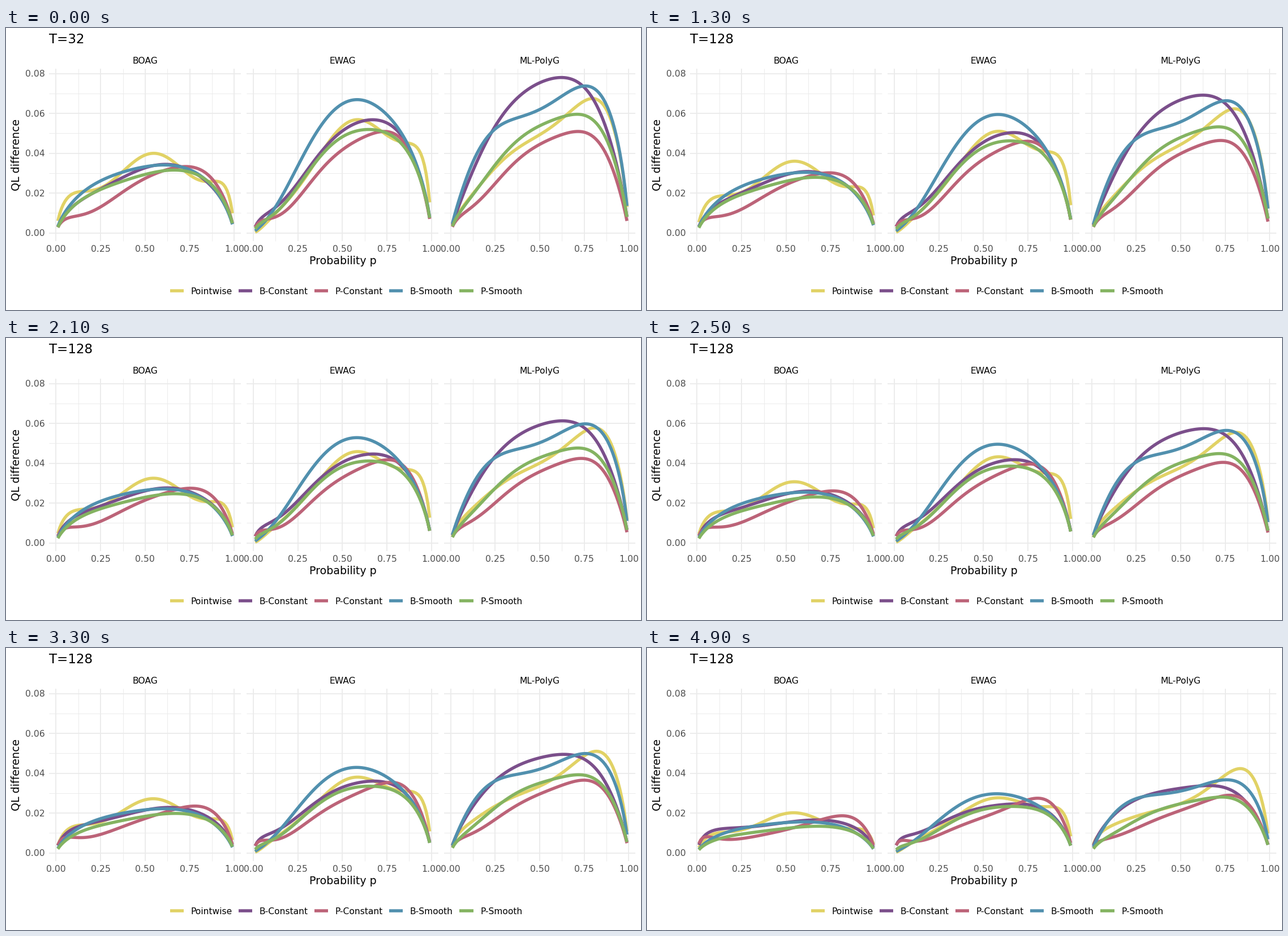
These frames come from a looping animation (1122x499 px, 8000 ms). A matplotlib script:

```python
import numpy as np
import matplotlib.pyplot as plt
from matplotlib.animation import FuncAnimation

W, H, DPI = 1122, 499, 64
PT = 72 / DPI                      # points per pixel
STEP_MS, FRAMES, HOLD, STEPS = 100, 80, 4, 45
LEFT, PANEL_GAP, UNIT_X = 88.5, 348.55, 314.7
ZERO_Y, UNIT_Y = 362.5, 3525
TOP, BOTTOM, PAD = 72, 376.5, 12

plt.rcParams["font.family"] = "DejaVu Sans"

# name, colour, legend key x
SERIES = [
    ("Pointwise", "#E1D265", 290),
    ("B-Constant", "#7B4F8B", 411),
    ("P-Constant", "#BC6378", 545),
    ("B-Smooth", "#5190AE", 677),
    ("P-Smooth", "#84B361", 801.5),
]

# Per series: height in thousandths at KEYS for T=32,
# and the share of it left at SHARE_KEYS for T=128.
KEYS = np.array([.01, .1, .35, .65, .9, .99])
SHARE_KEYS = np.array([.16, .42, .9])
PANELS = {
    "BOAG": [
        ((6, 19.9, 28.8, 36.3, 25.9, 9.8), (.5, .51, .47)),
        ((3, 13.7, 26.7, 34.2, 20.5, 4.5), (.7, .48, .58)),
        ((2.8, 8.2, 19, 32.4, 24.3, 5), (.72, .43, .67)),
        ((3.3, 16.2, 29.8, 33.9, 20.8, 4.3), (.48, .46, .46)),
        ((2.8, 13.6, 25.2, 31.5, 21.6, 4.8), (.45, .42, .44)),
    ],
    "EWAG": [
        ((.3, 7.5, 35.7, 55.2, 44.2, 15.3), (.62, .5, .52)),
        ((3, 11.2, 37.2, 56.7, 37.6, 7.5), (.7, .47, .47)),
        ((2.8, 7.3, 28.5, 49.2, 36.7, 7), (.65, .43, .63)),
        ((1, 9.8, 49.8, 65.6, 38, 8), (.52, .455, .45)),
        ((2, 8.4, 35.5, 51.9, 35.3, 7.5), (.55, .46, .47)),
    ],
    "ML-PolyG": [
        ((3.5, 16.8, 40.8, 59.2, 56.8, 13), (.66, .5, .68)),
        ((4, 25.8, 65.5, 77.8, 45, 8), (.57, .44, .48)),
        ((3, 11.6, 34.4, 50, 34.3, 6), (.56, .47, .65)),
        ((4.7, 30.2, 57, 70.1, 58.5, 13.5), (.54, .505, .5)),
        ((3.3, 16.2, 44.3, 58.8, 41.5, 8), (.5, .46, .49)),
    ],
}
PROB = np.linspace(.01, .99, 99)


def arch(p):
    return (p * (1 - p)) ** .75


def through(x, y, at):
    """Polynomial through the points (x, y), evaluated at `at`."""
    return np.polyval(np.polyfit(x, y, len(x) - 1), at)


def ends(heights, shares):
    """Curve at the start and at the end of the transition."""
    first = arch(PROB) * through(KEYS, np.array(heights) / 1000 / arch(KEYS), PROB)
    return first, first * through(np.sqrt(SHARE_KEYS), shares, np.sqrt(PROB))


def to_y(v):
    return ZERO_Y - UNIT_Y * v


fig = plt.figure(figsize=(W / DPI, H / DPI), dpi=DPI, facecolor="white")
ax = fig.add_axes([0, 0, 1, 1])
ax.set(xlim=(0, W), ylim=(H, 0))
ax.axis("off")


def label(x, y, s, px=15.5, color="black", ha="center", **kw):
    return ax.text(x, y, s, fontsize=px * PT, color=color, ha=ha,
                   va="baseline", **kw)


def tick(x, y, value, ha="center"):
    label(x, y, f"{value:.2f}", 15.7, "#4D4D4D", ha)


def stroke(xs, ys, color, px=5.5, z=3):
    return ax.plot(xs, ys, color=color, lw=px * PT, zorder=z,
                   solid_capstyle="butt")[0]


def draw_panel(name, x0):
    left, right = x0 - PAD, x0 + UNIT_X + PAD
    for k in range(9):
        x, y = x0 + UNIT_X * k / 8, to_y(k / 100)
        px = .95 if k % 2 else 1.9
        stroke([x, x], [TOP, BOTTOM], "#EBEBEB", px, 1)
        stroke([left, right], [y, y], "#EBEBEB", px, 1)
        if k % 2 == 0:
            tick(x, 396, k / 8)
    label(x0 + UNIT_X / 2, 62.7, name)


title = label(76.5, 27.3, "T=32", 23, ha="left")
label(595, 418, "Probability p", 19)
label(23.7, 224.3, "QL difference", 19, rotation=90, rotation_mode="anchor")
for k in range(0, 9, 2):
    tick(68.5, to_y(k / 100) + 5.7, k / 100, "right")

curves = []
for i, (name, rows) in enumerate(PANELS.items()):
    x0 = LEFT + i * PANEL_GAP
    draw_panel(name, x0)
    for (_, color, _), row in zip(SERIES, rows):
        first, last = ends(*row)
        line = stroke(x0 + UNIT_X * PROB, to_y(first), color)
        curves.append((line, first, last))

for name, color, x in SERIES:
    stroke([x, x + 24.5], [465.3, 465.3], color)
    label(x + 36.6, 471, name, ha="left")


def update(frame):
    step = min(max(frame - HOLD, 0), STEPS)
    title.set_text("T=128" if step else "T=32")
    for line, first, last in curves:
        line.set_ydata(to_y(first + (last - first) * step / STEPS))
    return [title] + [line for line, _, _ in curves]


anim = FuncAnimation(fig, update, frames=FRAMES, interval=STEP_MS,
                     repeat=True, repeat_delay=0, blit=False)
plt.show()
```
